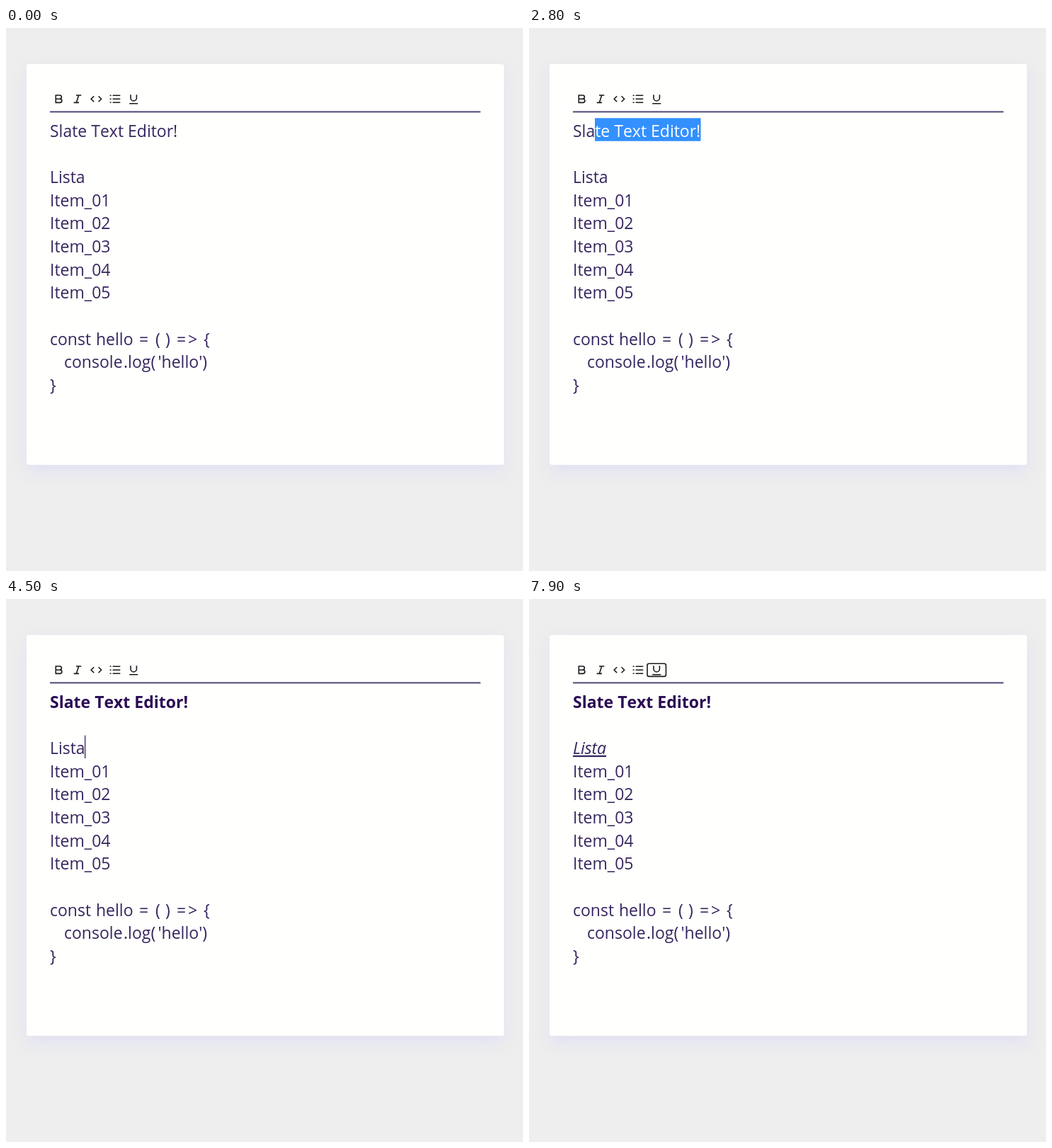
An HTML page that plays this animation: 730x767 px, repeating every 8000 ms.

```html
<!DOCTYPE html>
<html lang="en">
<head>
<meta charset="utf-8">
<title>Text editor</title>
<style>
html, body { margin: 0; width: 100%; height: 100%; overflow: hidden; background: #eee; }
#card {
  position: absolute; left: 29px; top: 51px; width: 674px; height: 566px;
  border-radius: 3px; background: #fffffd;
  box-shadow: 0 10px 22px rgba(210, 210, 250, .45);
}
svg { position: absolute; left: 0; top: 0; }
text { font: 23px "Open Sans", "Noto Sans", sans-serif; font-kerning: none; white-space: pre; }
#icons path, #focus { fill: none; stroke: #1a1a1a; stroke-width: 1.6; }
</style>
</head>
<body>
<div id="card"></div>
<svg width="730" height="767" viewBox="0 0 730 767">
  <clipPath id="clip"><rect id="range" height="32.5"/></clipPath>
  <g id="icons">
    <path transform="translate(74.8 100.2)" d="M-4.5 0H1.5a2.6 2.6 0 0 1 0 5.2H-4.5V-5.2H1a2.6 2.6 0 0 1 0 5.2"/>
    <path transform="translate(101 100.2)" d="M-2-5.2H5.3M-5.3 5.2H2M1.7-5.2L-1.7 5.2"/>
    <path transform="translate(127.4 100.2)" d="M-3.2-4L-7.2 0-3.2 4M3.2-4L7.2 0 3.2 4"/>
    <path transform="translate(153.8 100.2)" d="M-3.2-5H7.5M-3.2 0H7.5M-3.2 5H7.5M-7.2-5h2M-7.2 0h2M-7.2 5h2"/>
    <path transform="translate(180.2 100.2)" d="M-4.2-6V-1.4a4.2 4.2 0 0 0 8.4 0V-6M-6 6.6H6"/>
  </g>
  <rect id="focus" y="91.2" width="26.4" height="18.2" rx="2.5"/>
  <rect x="62" y="117.4" width="608" height="2" fill="#4b4978"/>
  <g fill="#37255f"><g id="doc"></g></g>
  <g clip-path="url(#clip)">
    <rect width="730" height="767" fill="#3390ff"/>
    <use href="#doc" fill="#fff"/>
  </g>
  <rect id="caret" width="1.3" height="32.5" fill="#37255f"/>
</svg>
<script>
const LOOP = 8000, LEFT = 62, TOP = 127.3, STEP = 32.67;
const $ = id => document.getElementById(id);
const rowTop = row => TOP + row * STEP;

function addText(row, x, str) {
  const el = document.createElementNS("http://www.w3.org/2000/svg", "text");
  el.setAttribute("x", x);
  el.setAttribute("y", rowTop(row) + 26.2);
  el.textContent = str;
  return $("doc").appendChild(el);
}

const title = addText(0, LEFT, "Slate Text Editor!");
const heading = addText(2, LEFT, "Lista");
for (let i = 1; i <= 5; i++) addText(2 + i, LEFT, "Item_0" + i);
[[62, "const"], [127, "hello"], [188, "="], [211, "("], [225, ")"], [241, "="], [257, ">"], [279, "{"]]
  .forEach(([x, s]) => addText(9, x, s));
[[82, "console"], [166, ".log("], [214.5, "'hello')"]].forEach(([x, s]) => addText(10, x, s));
addText(11, LEFT, "}");

// Drags run backwards from the end of a line, one letter edge per 100 ms
const drags = [
  { row: 0, from: 2300, to: 3300, end: 242.5, edges: [235, 227, 198, 157, 121, 93, 75, 62] },
  { row: 2, from: 4800, to: 6500, end: 111, edges: [98, 89, 79, 73, 62] }
];
const carets = [
  { row: 0, from: 1200, to: 1600, x: 242 },
  { row: 0, from: 2000, to: 2300, x: 242 },
  { row: 2, from: 4400, to: 4800, x: 111 }
];
const focuses = [
  { from: 3300, to: 4400, x: 61.4 },
  { from: 6500, to: 7600, x: 87.7 },
  { from: 7600, to: LOOP, x: 167 }
];

const active = (list, t) => list.find(o => t >= o.from && t < o.to);

function place(el, item, y) {
  el.style.display = item ? "" : "none";
  if (!item) return;
  el.setAttribute("x", item.x);
  if (y) el.setAttribute("y", rowTop(item.row));
}

function draw(t) {
  title.style.fontWeight = t >= 3700 ? 700 : 400;
  title.style.fill = t >= 3700 ? "#2b0d55" : "";
  heading.style.fontStyle = t >= 6700 ? "italic" : "normal";
  heading.style.textDecoration = t >= 7700 ? "underline" : "none";
  place($("caret"), active(carets, t), true);
  place($("focus"), active(focuses, t));

  const drag = active(drags, t);
  let width = 0;
  if (drag) {
    const i = Math.min(Math.floor((t - drag.from) / 100), drag.edges.length - 1);
    const x = drag.edges[i];
    width = drag.end - x;
    $("range").setAttribute("x", x);
    $("range").setAttribute("y", rowTop(drag.row));
  }
  $("range").setAttribute("width", width);
}

const start = performance.now();
function tick(now) {
  draw(Math.max(0, now - start) % LOOP);
  requestAnimationFrame(tick);
}
draw(0);
requestAnimationFrame(tick);
</script>
</body>
</html>
```
